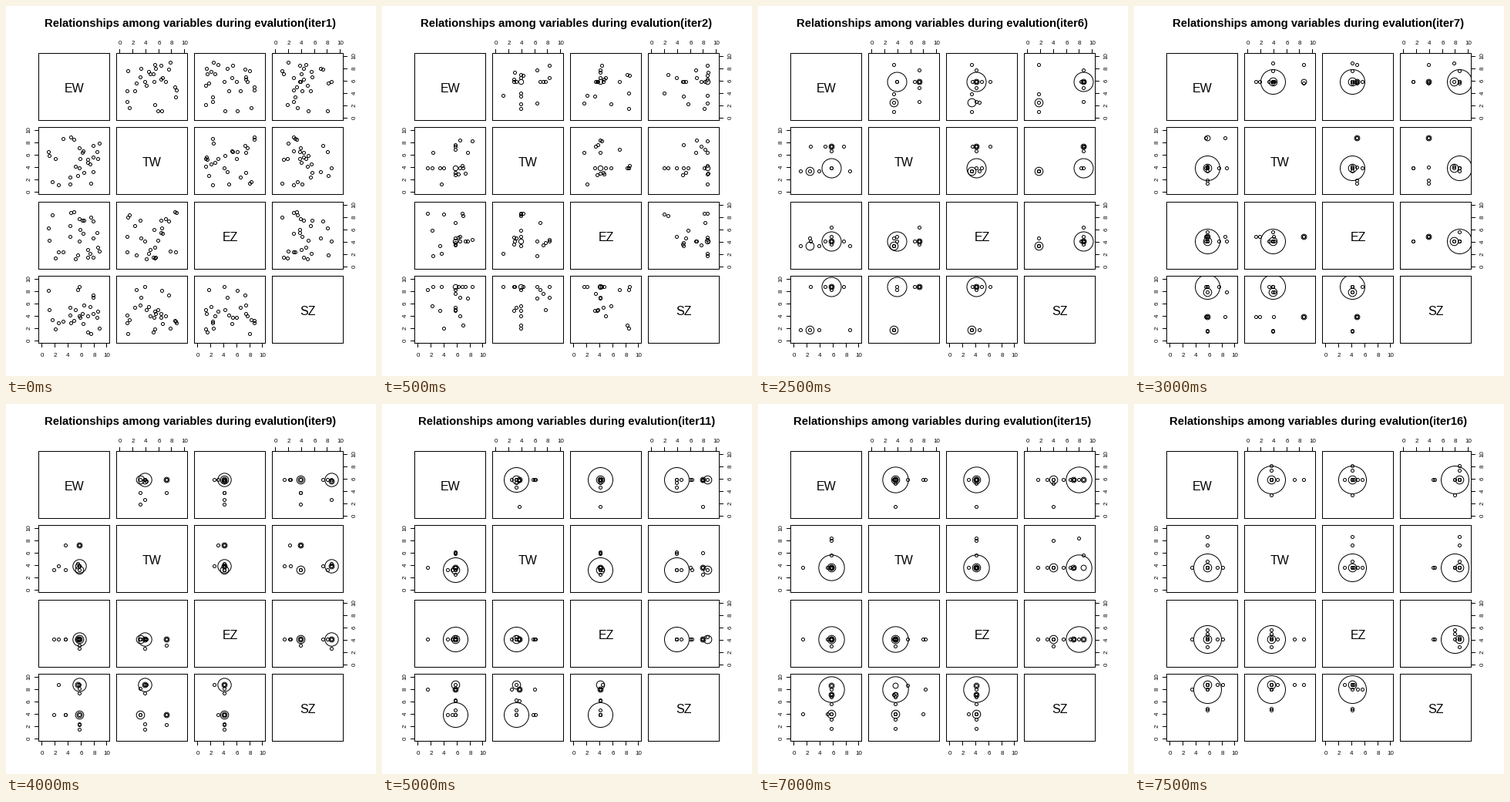
A matplotlib script for the animation above (8000 ms loop, 480x480 px).

```python
import random

import matplotlib.pyplot as plt
import numpy as np
from matplotlib.animation import FuncAnimation
from matplotlib.collections import EllipseCollection
from matplotlib.patches import Rectangle

SIZE, DPI = 480, 100
PX = 72 / DPI
ITERS, STEP = 16, 500
DOT = 2
NAMES = ["EW", "TW", "EZ", "SZ"]

# The best solution drifts; each stage starts at an iteration with a cluster
# radius, the genes of the best that change, and the variants gathering round it.
STAGES = [
    (1, 2, dict(EW=5.85, TW=3.9, EZ=4.1, SZ=8.7), []),
    (4, 5.5, {}, [dict(EW=2.5, TW=3.4, EZ=3.4, SZ=1.7), dict(TW=7.4)]),
    (7, 16, {}, [dict(SZ=7.8), dict(TW=8.7, EZ=4.9, SZ=3.9)]),
    (9, 8.7, {}, [dict(TW=3.2, SZ=3.9), dict(EW=5.6), dict(TW=7.2, SZ=3.9)]),
    (11, 16, dict(TW=3.2, SZ=3.9), [dict(SZ=8.7), dict(TW=3.6, SZ=8)]),
    (13, 14, dict(TW=3.6, SZ=8), [dict(SZ=4), dict(SZ=7.1), dict(SZ=8.6)]),
    (16, 18, {}, [dict(SZ=8.7)]),
]


def breed(k):
    """Population k as (genes, radius): clusters, then seeded mutants."""
    rng = random.Random(k)
    best = {}
    for start, _, changes, variants in STAGES:
        if start <= k:
            best = best | changes
            near = variants
    radius = np.interp(k, [s[0] for s in STAGES], [s[1] for s in STAGES])
    pop = [(best, radius)]
    pop += [(best | v, 3.4 if i else 5.3) for i, v in enumerate(near)]

    parents = [genes for genes, _ in pop]
    fresh = max(1, round(4 / k ** 0.6))
    for _ in range(11 + 16 // k):
        child = dict(rng.choice(parents))
        for gene in rng.sample(NAMES, fresh):
            child[gene] = rng.uniform(1, 9)
        pop.append((child, DOT))
    return pop


POPS = [breed(k) for k in range(1, ITERS + 1)]

plt.rcParams["font.family"] = "Liberation Sans"
fig = plt.figure(figsize=(SIZE / DPI, SIZE / DPI), dpi=DPI, facecolor="white")
ax = fig.add_axes([0, 0, 1, 1])
ax.set(xlim=(0, SIZE), ylim=(SIZE, 0))
ax.axis("off")

LEFT = [42 + 101 * i for i in range(4)]
TOP = [round(61 + 96.4 * i) for i in range(4)]
WIDTH, HEIGHT = 92, 87
RIGHT_EDGE, BOTTOM_EDGE = LEFT[-1] + WIDTH, TOP[-1] + HEIGHT


def sx(col, v):
    return round(LEFT[col] + 4.3 + 8.4 * v)


def sy(row, v):
    return round(TOP[row] + HEIGHT - 3.2 - 8 * v)


def line(x, y):
    ax.plot(x, y, color="black", lw=PX, antialiased=False, snap=True)


def label(x, y, s, px, **kw):
    return ax.text(x, y, s, fontsize=px * PX, ha="center", **kw)


def x_axis(col, edge, out, text_y):
    line([sx(col, 0), sx(col, 10)], [edge, edge])
    for v in range(0, 11, 2):
        x = sx(col, v)
        line([x, x], [edge, edge + out])
        label(x + 0.5, text_y, str(v), 8, va="baseline")


def y_axis(row, edge, out, text_x):
    line([edge, edge], [sy(row, 0), sy(row, 10)])
    for v in range(0, 11, 2):
        y = sy(row, v)
        line([edge, edge + out], [y, y])
        label(text_x, y, str(v), 8, va="center", rotation=90)


panels = {}
for r in range(4):
    for c in range(4):
        box = Rectangle((LEFT[c], TOP[r]), WIDTH, HEIGHT, fill=False,
                        ec="black", lw=PX, antialiased=False, snap=True)
        ax.add_patch(box)
        if r == c:
            label(LEFT[c] + WIDTH / 2 + 0.5, TOP[r] + HEIGHT / 2 + 7.5,
                  NAMES[r], 16, va="baseline")
        else:
            panels[r, c] = box

for i in (0, 2):
    x_axis(i, BOTTOM_EDGE, 5, 455)
    y_axis(i, RIGHT_EDGE, 5, 452)
for i in (1, 3):
    x_axis(i, TOP[0], -5, 50)
    y_axis(i, LEFT[0], -5, 30)

title = label(239.3, 27.3, "", 14.95, weight="bold", va="baseline")
dots = []


def update(n):
    title.set_text(f"Relationships among variables during evalution(iter{n + 1})")
    while dots:
        dots.pop().remove()
    pop = POPS[n]
    size = [2 * radius for _, radius in pop]
    for (r, c), box in panels.items():
        spots = [(sx(c, genes[NAMES[c]]) + 0.5, sy(r, genes[NAMES[r]]) + 0.5)
                 for genes, _ in pop]
        rings = EllipseCollection(
            size, size, [0] * len(pop), units="xy", offsets=spots,
            offset_transform=ax.transData, facecolors="none",
            edgecolors="black", linewidths=PX)
        ax.add_collection(rings, autolim=False)
        rings.set_clip_path(box)
        dots.append(rings)
    return [title, *dots]


anim = FuncAnimation(fig, update, frames=ITERS, interval=STEP,
                     repeat=True, repeat_delay=0, blit=False)
plt.show()
```
